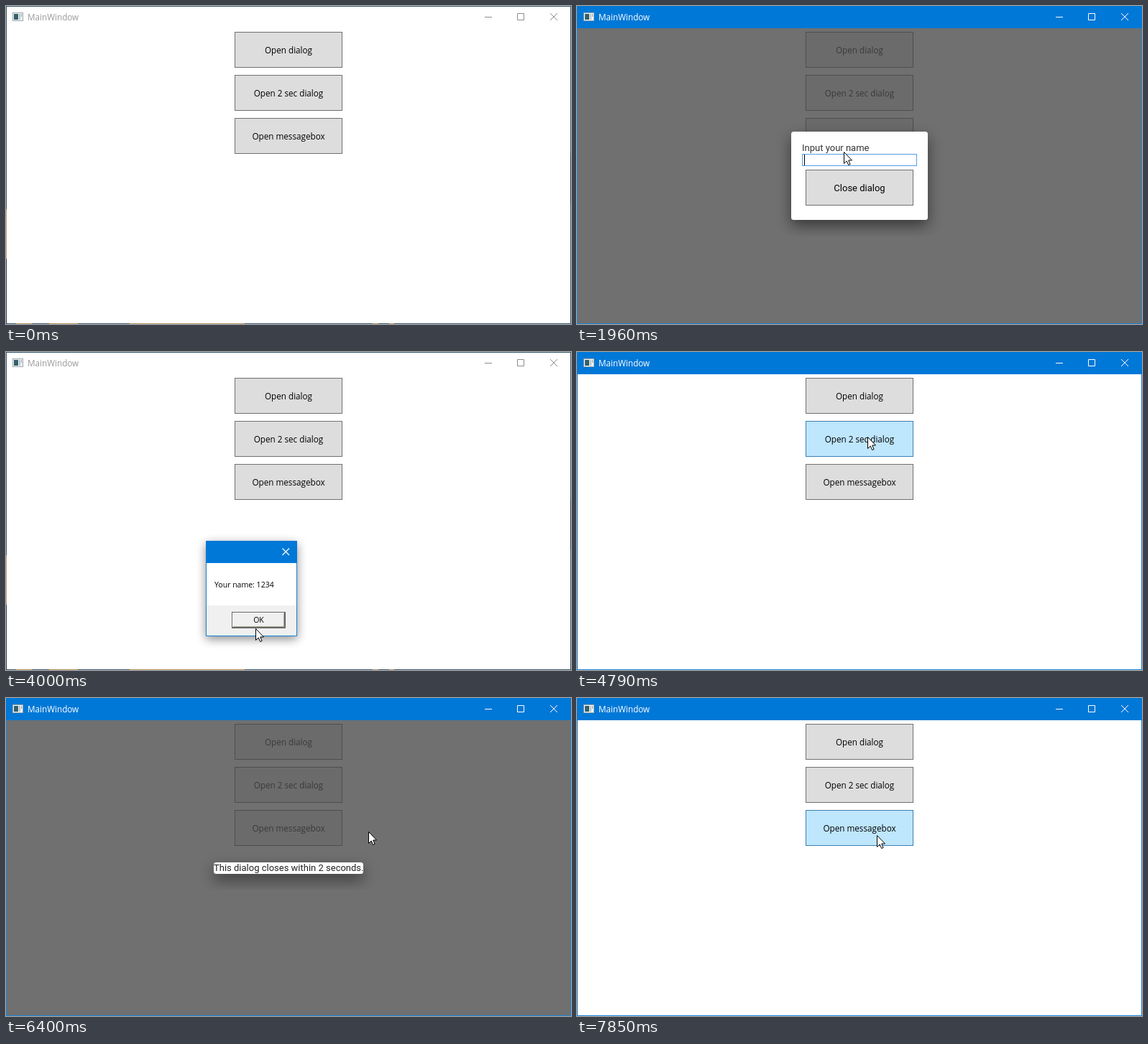
Animation of 786 by 443 pixels, one loop 8 s. Source, as an HTML page:

```html
<!DOCTYPE html>
<html lang="en">
<head>
<meta charset="utf-8">
<title>Dialogs</title>
<style>
  html, body { margin: 0; width: 100%; height: 100%; overflow: hidden; background: #fff; }
  svg { display: block; width: 100vw; height: 100vh; }
  text { font: 11.7px "Open Sans", sans-serif; white-space: pre; }
  .card text { font: 13px Roboto, sans-serif; }
  .msg text { font-size: 10.5px; }
  .mid { text-anchor: middle; }
</style>
</head>
<body>
<svg id="stage" viewBox="0 0 786 443"></svg>
<script>
const LOOP = 8000;
const stage = document.getElementById('stage');
const $ = id => document.getElementById(id);
const set = (id, attrs) => {
  for (const k in attrs) $(id).setAttribute(k, attrs[k]);
};

// ---------- scene ----------
const rect = (x, y, w, h, fill, more = '') =>
  `<rect x="${x}" y="${y}" width="${w}" height="${h}" fill="${fill}" ${more}/>`;
const box = (x, y, w, h, fill, line, more = '') =>
  rect(x + .5, y + .5, w - 1, h - 1, fill, `stroke="${line}" ${more}`);
const text = (x, y, s, more = '') => `<text x="${x}" y="${y}" ${more}>${s}</text>`;

const button = (id, y, label) =>
  `<g id="${id}">${box(318, y, 150, 50, '#ddd', '#707070')}${text(393, y + 30, label, 'class="mid"')}</g>`;

const card = (id, x, y, w, h, inner) => `
  <clipPath id="${id}Clip">${rect(x - 22, y - 22, w + 44, h + 44, '#000')}</clipPath>
  <g id="${id}" class="card"><g clip-path="url(#${id}Clip)">
    ${rect(x, y + 8, w, h, '#000', 'rx="3" opacity=".5" filter="url(#deep)"')}
    ${rect(x, y, w, h, '#fff', 'rx="3.5"')}${inner}
  </g></g>`;

const blur = (id, dev) =>
  `<filter id="${id}" x="-60" y="-60" width="906" height="563" filterUnits="userSpaceOnUse">
    <feGaussianBlur stdDeviation="${dev}"/></filter>`;

const frameBits = [[14, 36], [60, 100], [172, 332], [510, 518], [533, 540]]
  .map(([a, b]) => rect(a, 442, b - a, 1, '#b58f5c')).join('');

const appIcon = box(9, 9, 15, 12, '#f2f5f6', '#9aa7ad')
  + rect(11, 11, 6, 8, '#35616c') + rect(18, 11, 2, 8, '#b9c6ca') + rect(21, 11, 1, 4, '#8fa0a6');

stage.innerHTML = `
  <defs>${blur('deep', 10)}${blur('soft', 7)}</defs>
  ${rect(0, 0, 786, 443, '#fff')}
  <g id="idleFrame">
    ${box(0, 0, 786, 443, 'none', '#3a5a6d')}
    ${rect(0, 283, 1, 69, '#c3986c')}${rect(0, 352, 1, 91, '#2d4054')}${rect(785, 205, 1, 70, '#2d4054')}
    ${frameBits}
  </g>
  <g id="liveFrame">${box(0, 0, 786, 443, 'none', '#1883d7')}${rect(0, 0, 786, 31, '#0078d7')}</g>
  ${appIcon}
  <g id="caption">
    ${text(30, 20, 'MainWindow')}
    <path id="glyphs" fill="none" d="M666 15.5h10M711.5 10.5h9v9h-9zM757 10l10 10M767 10l-10 10"/>
  </g>
  ${button('b1', 36, 'Open dialog')}
  ${button('b2', 96, 'Open 2 sec dialog')}
  ${button('b3', 156, 'Open messagebox')}
  ${rect(1, 31, 784, 411, '#000', 'id="cover"')}
  ${card('form', 298, 175, 190, 123,
    text(313, 202, 'Input your name', 'fill="#333"')
    + box(313, 206, 160, 17, '#fff', '#569de5', 'id="field"')
    + text(316, 219, '', 'id="typed"')
    + rect(316, 207, 1, 15, '#000', 'id="caret"')
    + button('b4', 228, 'Close dialog'))}
  ${card('note', 289, 229, 208, 16,
    text(289, 241, 'This dialog closes within 2 seconds.', 'fill="#222"'))}
  <g id="msg" class="msg">
    ${rect(278, 267, 127, 133, '#000', 'opacity=".45" filter="url(#soft)"')}
    ${box(278, 263, 127, 133, '#fff', '#1883d7')}
    ${rect(278, 263, 127, 31, '#0078d7')}
    <path d="M384.5 273.500l9.500 9.500M394 273.500l-9.500 9.500" stroke="#fff" stroke-width="1.200"/>
    ${rect(279, 353, 125, 42, '#f0f0f0')}
    ${text(290, 328, 'Your name: 1234')}
    ${box(314, 362, 75, 23, '#f0f0f0', '#646464')}
    <path d="M315.500 383V363.500H387" fill="none" stroke="#fff"/>
    <path d="M315 383.500H387.500V363" fill="none" stroke="#696969"/>
    <path d="M316 382.500H386.500V364" fill="none" stroke="#b3a798"/>
    ${text(351.5, 377, 'OK', 'class="mid"')}
  </g>
  <path id="arrow" d="M.5.5V16.500L4.200 13 6.700 18.500 9.100 17.500 6.700 12H11.500Z" fill="#fff" stroke="#000"/>
  <circle id="busy" r="7.5" fill="none" stroke="#349ae3" stroke-width="5.500"/>`;

// ---------- timing ----------
// pointer stops: time, x, y
const stops = [
  [30, 656, 416], [170, 485, 170], [350, 485, 170], [560, 432, 80], [640, 416, 53],
  [1220, 416, 53], [1400, 345, 195], [1500, 314, 241], [1680, 371, 203],
  [2930, 371, 203], [3200, 361, 247], [3700, 361, 247], [3720, 361, 250],
  [3900, 343, 340], [4000, 347, 385], [4180, 347, 385], [4230, 347, 382],
  [4450, 347, 382], [4790, 404, 118], [5250, 404, 118], [5480, 450, 200],
  [5700, 400, 270], [5950, 216, 230], [6100, 300, 169], [6220, 450, 287],
  [6320, 554, 240], [6400, 505, 186], [6540, 380, 170], [6700, 260, 205],
  [6850, 330, 280], [7020, 500, 240], [7250, 470, 150], [7470, 400, 125],
  [7520, 400, 125], [7850, 417, 191]
];

const clamp = v => Math.max(0, Math.min(1, v));
const sine = x => .5 - .5 * Math.cos(Math.PI * clamp(x));
const within = (t, a, b) => t >= a && t < b;
// rises from a, falls from b
const swell = (t, a, b, d = 300) => sine((t - a) / d) - sine((t - b) / d);

const slope = (i, k) => (stops[i + 1][k] - stops[i][k]) / (stops[i + 1][0] - stops[i][0]);
function tangent(i, k) {
  if (i === 0 || i === stops.length - 1) return 0;
  const a = slope(i - 1, k), b = slope(i, k);
  return a * b <= 0 ? 0 : 2 * a * b / (a + b);
}
function pointer(t) {
  const last = stops.length - 1;
  if (t <= stops[0][0]) return stops[0].slice(1);
  if (t >= stops[last][0]) return stops[last].slice(1);
  const i = stops.findIndex((s, n) => t < stops[n + 1][0]);
  const h = stops[i + 1][0] - stops[i][0], u = (t - stops[i][0]) / h;
  return [1, 2].map(k => {
    const p = stops[i][k], q = stops[i + 1][k];
    return p + (q - p) * u * u * (3 - 2 * u)
      + h * u * (1 - u) * ((1 - u) * tangent(i, k) - u * tangent(i + 1, k));
  });
}

const looks = {
  normal: ['#ddd', '#707070', '#000'],
  hover: ['#bee6fd', '#3c7fb1', '#000'],
  pressed: ['#c4e5f6', '#2c628b', '#000'],
  off: ['#f4f4f4', '#adb2b5', '#838383']
};
function paintButton(id, look) {
  const [rc, label] = $(id).children, [fill, line, ink] = looks[look];
  rc.setAttribute('fill', fill);
  rc.setAttribute('stroke', line);
  label.setAttribute('fill', ink);
}

const zoom = (x, y, s) => `translate(${x} ${y}) scale(${s}) translate(${-x} ${-y})`;
function popCard(id, p) {
  set(id, { opacity: p, transform: zoom(393, 236.5, p), display: p > .002 ? 'inline' : 'none' });
}

function draw(t) {
  const [x, y] = pointer(t);
  const live = within(t, 690, 3360) || t >= 4430;
  set('liveFrame', { display: live ? 'inline' : 'none' });
  set('caption', { fill: live ? '#fff' : '#999' });
  set('glyphs', { stroke: live ? '#fff' : '#8c8c8c' });

  const off = within(t, 780, 3360) || within(t, 5060, 7075);
  const down = { b1: within(t, 690, 780), b2: within(t, 5020, 5060), b4: within(t, 3240, 3330) };
  const over = top => t >= 30 && x >= 318 && x < 468 && y >= top && y < top + 50;
  [['b1', 36], ['b2', 96], ['b3', 156], ['b4', 228]].forEach(([id, top]) => {
    const look = id !== 'b4' && off ? 'off' : down[id] ? 'pressed' : over(top) ? 'hover' : 'normal';
    paintButton(id, look);
  });

  const note = swell(t, 5075, 7075);
  set('cover', { opacity: .56 * (swell(t, 780, 3360) + note) });
  popCard('form', sine((t - 780) / 300) - sine((t - 3445) / 260));
  popCard('note', note);

  const n = [2340, 2400, 2520, 2700].filter(k => t >= k).length;
  const blink = t < 2340 ? within(t, 900, 1430) || t >= 1960 : t < 3230;
  $('typed').textContent = '1234'.slice(0, n);
  set('caret', { x: Math.round(316 + 7.3 * n), opacity: blink ? 1 : 0 });
  set('field', { stroke: t < 3240 ? '#569de5' : '#abadb3' });

  const m = clamp((t - 3388) / 150) - clamp((t - 4400) / 150);
  set('msg', {
    opacity: m, display: m > 0 ? 'inline' : 'none',
    transform: zoom(320, 301, .945 + .055 * m)
  });

  const wait = within(t, 3350, 3720);
  set('arrow', {
    display: t >= 30 && !wait ? 'inline' : 'none',
    transform: `translate(${Math.round(x)} ${Math.round(y)})`
  });
  set('busy', { display: wait ? 'inline' : 'none', cx: x, cy: y });
}

const start = performance.now();
function tick() {
  draw((performance.now() - start) % LOOP);
  requestAnimationFrame(tick);
}
tick();
</script>
</body>
</html>
```
